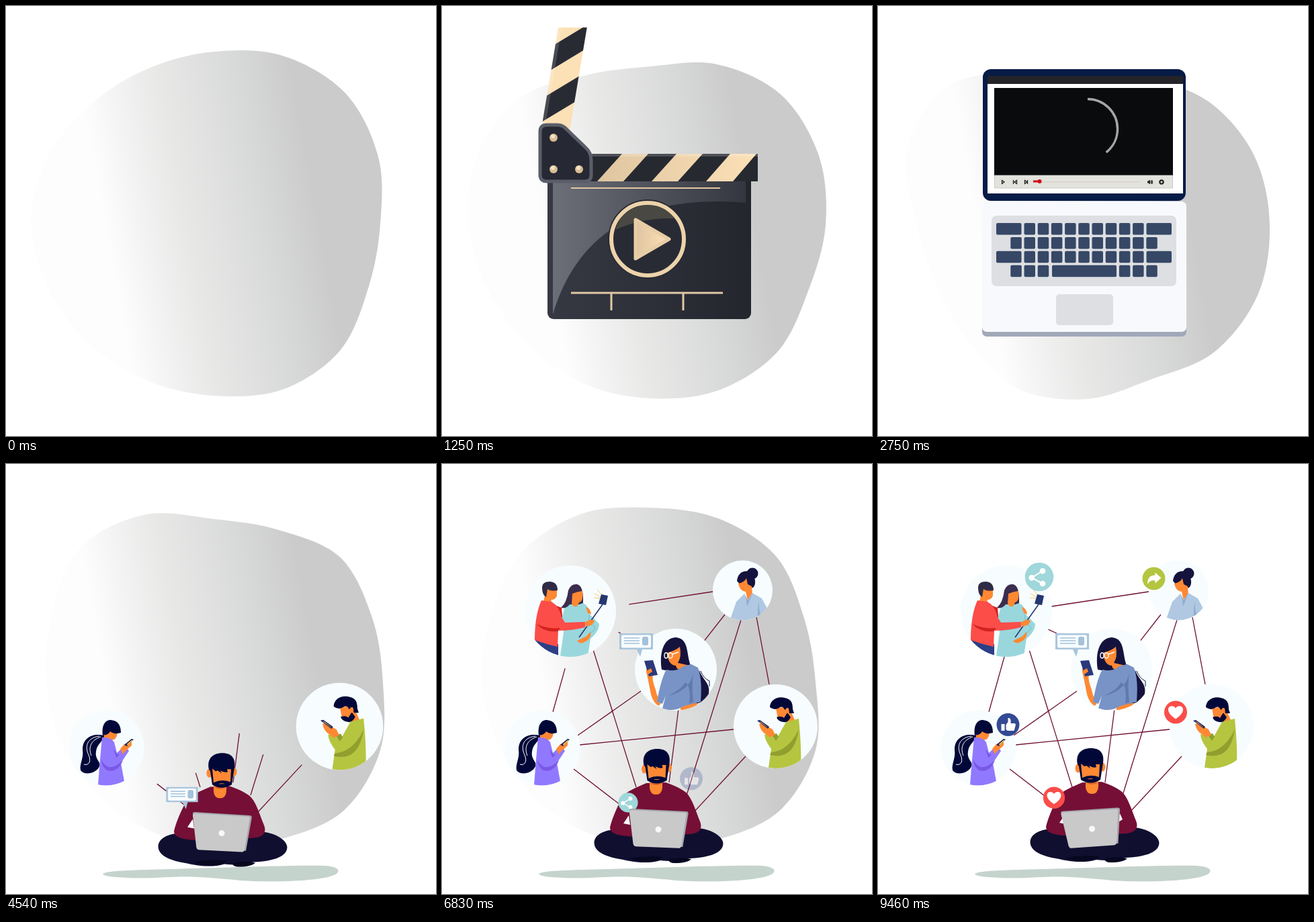
Recreate the animation shown at these times as an HTML page. Size 640 by 640 pixels, loop 9.5 s.

```html
<!DOCTYPE html>
<html lang="en">
<head>
<meta charset="utf-8">
<title>Social video network</title>
<style>
html, body { margin: 0; width: 100%; height: 100%; overflow: hidden; background: #fff; }
svg { display: block; width: 100%; height: 100%; }
.skin { fill: #ff8833; }
.hair { fill: #010838; }
#lines path { fill: none; stroke: #6e0f34; stroke-width: 1.3; }
</style>
</head>
<body>
<svg id="stage" viewBox="0 0 640 640">
<defs>
  <linearGradient id="grey" gradientUnits="userSpaceOnUse" x1="147" y1="320" x2="456" y2="264">
    <stop offset="0" stop-color="#fdfdfd"/><stop offset=".2" stop-color="#f1f1f1"/>
    <stop offset=".37" stop-color="#e8e8e7"/><stop offset=".73" stop-color="#d8dad9"/>
    <stop offset="1" stop-color="#cbcbcb"/>
  </linearGradient>
  <linearGradient id="board" x2="1"><stop stop-color="#363943"/><stop offset="1" stop-color="#24262e"/></linearGradient>
  <linearGradient id="glare" x2="1"><stop stop-color="#6c6f78"/><stop offset="1" stop-color="#353740"/></linearGradient>
  <linearGradient id="cream" x2="1"><stop stop-color="#dfc6a1"/><stop offset="1" stop-color="#fce0b6"/></linearGradient>
  <clipPath id="below"><path d="M0 32H640V640H0z"/></clipPath>
  <g id="heart"><circle r="17" fill="#fb4d49"/><path fill="#fff" d="M0 10C-7 5-11 1-11-4C-11-10-3-11 0-6C3-11 11-10 11-4C11 1 7 5 0 10z"/></g>
  <g id="thumb"><circle r="17" fill="#334a93"/><path fill="#fff" d="M-10-1H-5V9H-10zM-3 0L0-4V-10Q5-11 4-2H10Q12-1 11 2L9 9H-1L-3 7z"/></g>
  <g id="share"><circle r="17" fill="#9fd7da"/><path fill="none" stroke="#fff" stroke-width="1.6" d="M4-7L-9 1L4 8"/><g fill="#fff"><circle cx="4" cy="-7" r="3.5"/><circle cx="-9" cy="1" r="3.5"/><circle cx="4" cy="8" r="3.5"/></g></g>
  <g id="arrow"><circle r="17" fill="#b4c540"/><path fill="#fff" d="M2-9L11-1L2 7V3C-4 2-7 4-9 9C-10 0-6-5 2-5z"/></g>
  <g id="chat"><path fill="#a9c5dc" d="M-25-12H25V12H9L6 23L1 12H-25z"/><rect x="-22" y="-9.500" width="44" height="19" rx="2" fill="#f8fcff"/><path stroke="#a3c1da" stroke-width="1.6" d="M-18-5H5M-18-1H5M-18 3H5"/><rect x="9" y="-7" width="9" height="13" rx="3" fill="#a3c1da"/></g>
</defs>

<path id="blob" fill="url(#grey)"/>

<g clip-path="url(#below)"><g id="clapper">
  <g id="arm">
    <path fill="#fce0b6" d="M0-21H310V21H0z"/>
    <path id="armStripes" fill="#292b34"/>
    <path fill="#fff" opacity=".15" d="M0-21H310V-16H0z"/>
  </g>
  <rect x="157" y="226" width="303" height="240" rx="9" fill="url(#board)"/>
  <path fill="url(#glare)" d="M165 261H452V293C310 281 205 325 165 459z"/>
  <path fill="#272931" d="M205 220H470V261H205z"/>
  <path fill="url(#cream)" d="M268 220h39l-37 41h-39zM349 220h39l-37 41h-39zM429 220h39l-35 41h-40z"/>
  <path fill="#fff" opacity=".18" d="M220 220H470V224H220z"/>
  <path fill="none" stroke="#e0c8a4" stroke-width="2" d="M192 271H414"/>
  <path fill="none" stroke="#e0c8a4" stroke-width="3" d="M192 427H418M252 427V453M359 427V453"/>
  <circle cx="306" cy="347" r="59" fill="#292b34"/>
  <path fill="#494842" d="M258 333A50 50 0 0 1 346 316Q297 315 258 333z"/>
  <circle cx="306" cy="347" r="54" fill="none" stroke="#edd3ab" stroke-width="6"/>
  <path fill="url(#cream)" stroke="#e8cda6" stroke-width="5" stroke-linejoin="round" d="M288 318V376L338 347z"/>
  <path fill="#262833" stroke="#5b5e69" stroke-width="5" d="M156 177H172Q180 177 186 184L213 210Q222 218 222 229V252Q222 261 212 261H156Q146 261 146 251V187Q146 177 156 177z"/>
  <g fill="#d9bd95"><circle cx="166" cy="196" r="6"/><circle cx="166" cy="243" r="6"/><circle cx="204" cy="243" r="6"/></g>
  <g fill="#f3e3ca"><circle cx="165" cy="194" r="3"/><circle cx="165" cy="241" r="3"/><circle cx="203" cy="241" r="3"/></g>
</g></g>

<g id="laptop">
  <rect x="155" y="300" width="304" height="192" rx="7" fill="#a0a9b9"/>
  <rect x="155" y="291" width="304" height="194" rx="7" fill="#f8f9fc"/>
  <rect x="156" y="94" width="302" height="196" rx="12" fill="#071b47"/>
  <path fill="#232328" d="M163 104H454V116H163z"/><path fill="#fff" d="M163 116H454V279H163z"/>
  <path fill="#0a0b0d" d="M173 122H439V252H173z"/>
  <path fill="#e2e3dd" stroke="#b9bab5" stroke-width=".7" d="M173.500 252H438.500V271H173.500z"/>
  <path id="spinner" pathLength="360" fill="none" stroke="#a5a5a6" stroke-width="3.500" d="M312 138.500A44.500 44.500 0 0 1 312 227.500A44.500 44.500 0 0 1 312 138.500"/>
  <path fill="none" stroke="#222" stroke-width="1.300" d="M184.500 259.500V264.500L188 262zM201.500 259V265M206.500 259.500V264.500L203 262zM222.500 259V265M218.500 259.500V264.500L222 262zM406 260Q407.500 262 406 264M407.500 259Q409.500 262 407.500 265"/>
  <path fill="#222" d="M401 260.500H402.500L405 258.500V265.500L402.500 263.500H401z"/>
  <circle cx="422" cy="262" r="2.600" fill="none" stroke="#222" stroke-width="2"/>
  <circle cx="422" cy="262" r="3.500" fill="none" stroke="#222" stroke-dasharray="1.400 1.350"/>
  <path stroke="#d9a9a5" stroke-dasharray="1 1" d="M231 262H390"/>
  <path id="progress" stroke="#d20a18" stroke-width="3"/><circle id="knob" cy="261" r="3" fill="#d20a18"/>
  <rect x="169" y="312" width="275" height="105" rx="7" fill="#dedfe3"/>
  <g id="keys" fill="#364866"></g>
  <rect x="265" y="429" width="85" height="46" rx="5" fill="#dedfe3"/>
</g>

<g id="lines"></g>
<g id="people"></g>

<g id="seated">
  <path fill="#c5d3cd" d="M144 610C150 604 210 604 280 602C350 600 430 597 475 598C493 599 500 605 490 611C470 621 400 623 350 620C290 614 260 613 220 616C180 617 145 615 144 610z"/>
  <g id="bobbing">
    <path fill="#100f30" d="M226.500 563C227 545 255 540 285 543L380 541C400 542 418.500 553 418.500 564C418 580 392 585 368 586C360 590 345 591 325 589C305 595 282 591 270 588C245 584 227 577 226.500 563z"/>
    <path fill="#070720" d="M279 586Q305 581 330 584Q322 591 302 591Q288 590 279 586zM337 588Q350 583 371 587Q365 593 346 593Q338 593 337 588z"/>
    <path fill="#750f35" d="M304 474C288 481 275 486 269 494C262 507 253 526 250 540C250 552 272 553 290 554L368 550C384 549 388 541 384 531C377 514 372 495 362 487C352 480 342 476 333 473z"/>
    <path fill="#fff" d="M278 522L270 534L280 536zM360 520L364 529L356 534z"/>
    <path class="skin" d="M309 465H328V481Q327 491 318.500 491Q310 491 309 481z"/><path fill="#d9622a" d="M309 474H328Q319 480 309 474z"/>
    <g id="head">
      <ellipse class="skin" cx="300.500" cy="453" rx="4" ry="6.500"/><ellipse class="skin" cx="337.500" cy="451" rx="4" ry="6.500"/>
      <path class="hair" d="M300 447C297 433 304 423 320 423C335 423 340 432 338 445L334 470Q319 479 305 470L302 450z"/>
      <path class="skin" d="M305 446L310 450L313 449L319 453L317 449Q324 453 328 451L327 447L333 447L332 466Q319 461 307 467z"/>
      <path class="skin" d="M314 469H324Q319 467 314 469z"/>
    </g>
  </g>
</g>
<g id="floating"></g>
<g id="notebook">
  <path fill="#a4a6ad" d="M-44-28Q-44-30-41-30L40-28Q44-28 44-25L37 25L-35 24z"/>
  <path fill="#c9c9c9" d="M-44-26Q-43-28-40-28L38-26Q42-26 41-23L35 23Q34 27 31 27L-33 26Q-36 26-37 22z"/>
  <circle r="4.500" fill="#f8f8f8"/>
</g>
<g id="badges"></g>
</svg>

<script>
const LOOP = 9500;
const $ = id => document.getElementById(id);
const clamp = x => Math.max(0, Math.min(1, x));
const span = (t, start, end) => clamp((t - start) / (end - start));
const smooth = x => x * x * (3 - 2 * x);
const pop = (t, start, length = 600) => {
  const u = span(t, start, start + length) - 1;
  return 1 + 2 * u ** 3 + u * u;
};
const place = (el, x, y, scale, opacity = 1) => {
  el.setAttribute('transform', `translate(${x} ${y}) scale(${scale})`);
  el.setAttribute('opacity', opacity);
  el.style.display = scale > 0.001 && opacity > 0 ? '' : 'none';
};
const scaleAbout = (el, x, y, scale, opacity = 1) => {
  place(el, x, y, scale, opacity);
  el.setAttribute('transform', `translate(${x} ${y}) scale(${scale}) translate(${-x} ${-y})`);
};

// Value at time t from [time, value] pairs
function keyed(keys, t, ease = smooth) {
  const i = keys.findIndex(k => k[0] > t);
  if (i === 0) return keys[0][1];
  if (i < 0) return keys.at(-1)[1];
  const [[t0, a], [t1, b]] = [keys[i - 1], keys[i]];
  return a + (b - a) * ease((t - t0) / (t1 - t0));
}

// Blob: radii at equal angles clockwise from the right, around (310, 325)
const blobTimes = [0, 1250, 2750, 4540, 5420, 6830, 9460];
const blobRadii = [
  [247, 248, 265, 266, 255, 253, 257, 264, 273, 267, 256, 252, 257, 271, 276, 264],
  [261, 255, 268, 267, 259, 257, 256, 260, 271, 277, 269, 241, 235, 258, 274, 271],
  [273, 276, 269, 250, 260, 265, 247, 241, 253, 289, 291, 247, 229, 236, 258, 270],
  [251, 267, 271, 253, 245, 241, 241, 245, 250, 262, 283, 270, 243, 246, 264, 254],
  [246, 267, 271, 254, 245, 243, 243, 244, 249, 260, 281, 275, 253, 252, 262, 248],
  [246, 266, 271, 254, 244, 243, 243, 244, 251, 257, 272, 271, 260, 264, 265, 248],
  [246, 266, 271, 254, 244, 243, 243, 244, 251, 255, 258, 263, 278, 283, 269, 249]];

function blobPath(t) {
  const n = blobRadii[0].length;
  const points = blobRadii[0].map((_, i) => {
    const r = keyed(blobTimes.map((time, k) => [time, blobRadii[k][i]]), t, x => x);
    const a = i * 2 * Math.PI / n;
    return [310 + r * Math.cos(a), 325 + r * Math.sin(a)];
  });
  const at = i => points[(i + n) % n];
  let d = 'M' + points[0];
  for (let i = 0; i < n; i++) {
    const [a, b, c, e] = [at(i - 1), at(i), at(i + 1), at(i + 2)];
    d += 'C' + [0, 1].map(k => b[k] + (c[k] - a[k]) / 6) + ' '
      + [0, 1].map(k => c[k] - (e[k] - b[k]) / 6) + ' ' + c;
  }
  return d + 'z';
}

// Clapper arm stripes and keyboard
$('armStripes').setAttribute('d', [0, 1, 2, 3].map(k => `M${21 + 78 * k}-21h39l36 42h-39z`).join(''));
const key = (x, y, w = 16.5) => `<rect x="${x}" y="${y}" width="${w}" height="17.500" rx="2"/>`;
const column = i => 197.3 + 20.2 * i;
for (let row = 0; row < 4; row++) {
  const y = 323 + 20.9 * row, wide = row % 2 === 0;
  let html = wide ? key(176, y, 37.5) + key(399.5, y, 37.5) : key(column(0), y) + key(column(10), y);
  for (let i = 1; i < 10; i++) if (row < 3 || i < 3 || i > 7) html += key(column(i), y);
  if (row === 3) html += key(259, y, 96);
  $('keys').innerHTML += html;
}

// Connections: path, start, end
const lines = [
  ['M265 507L196 454', 3900, 5000], ['M289 481L225.500 278', 4290, 6700],
  ['M338 474L360 302L421 224', 4130, 5650], ['M364 493L445 232', 4160, 5800],
  ['M375 518L452 435', 3650, 4700], ['M434 395L205 418', 5100, 6300],
  ['M202 404L296 338', 5240, 6200], ['M487 328L468 228', 5600, 6500],
  ['M403 190L258 212', 5800, 7000], ['M165 369L188 287', 6000, 7050],
  ['M266 252L253 246', 6700, 7200],
].map(([d, start, end]) => {
  $('lines').insertAdjacentHTML('beforeend', `<path d="${d}" pathLength="1"/>`);
  return { el: $('lines').lastChild, start, end };
});

const people = [
  { x: 149.5, y: 422.5, r: 56, start: 3850, art: `
    <path class="hair" d="M146 404C128 400 114 408 114 425C116 438 109 446 111 456C117 464 134 461 139 450C142 443 132 440 134 428C135 418 143 413 147 406z"/>
    <path fill="none" stroke="#fff" d="M139 405C118 408 118 423 123 433C128 445 121 449 116 447M141 406C124 412 123 424 127 434"/>
    <path class="skin" d="M149 397H166Q166 407 161 410L153 412L145 408z"/>
    <path class="hair" d="M144 404C142 388 148 381 156 381C167 382 171 389 171 400Q161 403 155 398Q153 403 144 404z"/>
    <path fill="#9179ff" d="M143 407Q156 406 161 414L165 430L177 419L183 427L171 445L176 472Q157 481 137 478L140 440z"/>
    <path fill="#7a58e6" d="M142 440Q152 462 174 441Q166 460 151 456Q143 452 142 440zM160 424L165 431L169 433L164 437z"/>
    <path class="skin" d="M170 424L176 417L187 414L187 419L178 427L174 432z"/>
    <path fill="#20255e" d="M176 418L187 409L190 410L180 420z"/><path fill="#ffc34d" d="M180 417L187 411L189 411L181 419z"/>` },
  { x: 496.5, y: 390.5, r: 62.5, start: 4140, art: `
    <path class="skin" d="M497 363L517 361L521 372L525 381L514 386L512 380L500 380z"/>
    <path class="hair" d="M498 377Q505 374 509 378L514 370L519 377Q514 386 508 384Q500 383 498 377zM488 362C488 351 500 345 510 348C521 350 522 357 522 365L524 371L517 371L515 363L510 366Q508 360 503 362Q496 368 488 362z"/>
    <ellipse class="skin" cx="514" cy="367" rx="2.500" ry="4"/>
    <path fill="#b5c540" d="M512 384L531 379C533 400 535 425 534 447Q512 456 486 452L490 424Q480 411 480 402L489 403L497 411z"/>
    <path fill="#909f2d" d="M531 395Q516 427 490 429L488 433Q524 442 531 395zM490 403L498 401L501 406L497 412z"/>
    <path class="skin" d="M472 387L477 386L492 395L496 403L488 407L482 402Q474 398 472 387z"/>
    <path fill="#20255e" d="M469 382L473 381L487 391L485 394z"/><path fill="#ffc34d" d="M472 383L483 391L485 392L475 384z"/>` },
  { x: 191, y: 219, r: 68, start: 5200, art: `
    <path fill="#2c3f87" d="M138 260L173 268V290H138z"/>
    <path class="skin" d="M155 186H171V196Q169 202 163 202L162 208L151 205z"/>
    <path fill="#2f2b47" d="M149 184Q149 175 161 175Q172 176 172 188Q162 190 157 186L155 198Q149 195 149 184z"/>
    <path fill="#d4221f" d="M160 207L178 214L180 238L165 235z"/>
    <path fill="#9ad7dd" d="M184 209L210 207Q219 211 219 223L234 238Q234 249 221 260L217 286Q194 290 176 286L181 250L178 230z"/>
    <path fill="#3b2d4e" d="M188 188Q192 178 201 179Q211 181 210 207L204 209L190 209Q185 216 177 214Q186 206 188 188z"/>
    <path class="skin" d="M194 193Q201 190 209 189Q211 204 204 206L201 212Q195 213 193 208zM214 213Q221 214 222 224L217 222z"/>
    <path fill="none" stroke="#74b9c2" d="M219 224V239Q226 238 228 245Q225 250 219 252"/>
    <path fill="#fc4d49" d="M148 203L163 205Q174 211 178 228L183 236L213 235V243Q195 248 173 248L172 272Q154 268 138 262Q138 225 148 203z"/>
    <path fill="#d4221f" d="M141 238Q156 246 176 244L172 249Q151 251 141 238z"/>
    <path stroke="#26366f" stroke-width="1.600" d="M204 258L239 209"/>
    <path class="skin" d="M212 237Q219 230 227 233Q226 240 215 242zM201 263L214 257L221 250Q223 260 212 265Q205 269 201 263z"/>
    <path fill="#26366f" d="M237 194L247 196L244 210L233 208z"/>
    <path stroke="#ffc36b" d="M236 198L227 193M237 194L231 187M235 200L226 199"/>` },
  { x: 348, y: 306, r: 61, start: 5600, art: `
    <path fill="#15133e" d="M383 307C388 322 400 326 397 342C393 357 378 357 361 358zM327 306C323 280 330 259 348 258C369 260 363 285 371 302L354 311z"/>
    <path fill="none" stroke="#15133e" d="M385 308Q389 319 398 323V331"/>
    <path class="skin" d="M335 281Q347 278 354 272Q357 287 351 296L368 300L360 305Q350 309 348 300Q337 300 335 281zM304 309Q303 303 309 302L314 314Q312 320 318 336Q320 348 327 354L323 360Q315 357 311 343Q307 322 304 309zM355 363Q365 355 381 356L375 366H355z"/>
    <g fill="none" stroke="#fff" stroke-width="1.400"><ellipse cx="333.500" cy="285" rx="2.500" ry="4"/><ellipse cx="340" cy="285" rx="3" ry="4"/><path d="M343 283L352 280"/></g>
    <path fill="#7893c6" d="M334 306Q349 310 359 301L371 298L381 303C387 320 386 338 385 354L361 360Q344 370 328 364L333 345L328 357L320 354C323 337 327 318 334 306z"/>
    <path fill="#6179ad" d="M374 310Q371 330 374 354L368 357Q371 330 362 325Q356 336 337 345Q370 337 374 310z"/>
    <path fill="#2b397b" d="M301 293L314 292L321 314L308 316z"/><path class="skin" d="M304 308L311 304L313 309L307 313z"/>` },
  { x: 447.5, y: 188, r: 44.5, start: 5800, art: `
    <circle cx="462" cy="163" r="8.500" fill="#15133e"/>
    <path fill="#15133e" d="M439 174C440 163 448 158 456 160C466 164 469 178 463 184L449 186z"/>
    <path class="skin" d="M441 178Q450 176 453 170L455 179L461 182L462 196L455 203L452 190Q443 189 441 178z"/>
    <path fill="#b0c8e1" d="M450 193L455 202L462 192L476 200L484 215Q462 239 429 231L438 205z"/>
    <path fill="#91add1" d="M462 193L455 203L452 196L454 212zM472 205Q471 220 476 226L470 230Q469 215 472 205z"/>` },
].map((p, i) => {
  $('people').insertAdjacentHTML('beforeend', `<g><clipPath id="ring${i}"><circle cx="${p.x}" cy="${p.y}" r="${p.r}"/></clipPath>
    <circle cx="${p.x}" cy="${p.y}" r="${p.r}" fill="#f7fdff"/><g clip-path="url(#ring${i})">${p.art}</g></g>`);
  return { ...p, el: $('people').lastChild };
});

const addIcon = (parent, name) => {
  $(parent).insertAdjacentHTML('beforeend', `<g><use href="#${name}"/></g>`);
  return $(parent).lastChild;
};
const badges = [
  ['chat', 289, 264, 1, 6000], ['share', 240, 168, 1.25, 7000], ['arrow', 410.5, 170.5, 1, 7300],
  ['heart', 443, 369.5, 1, 7500], ['thumb', 193.5, 388, 1, 7900],
].map(([name, x, y, size, start]) => ({ el: addIcon('badges', name), x, y, size, start }));
const floats = [
  ['chat', 262, 511, 3850], ['thumb', 371, 518, 5020], ['share', 277, 515, 6430],
  ['arrow', 371, 518, 7500], ['heart', 262, 516, 8760],
].map(([name, x, y, start]) => ({ el: addIcon('floating', name), x, y, start }));

const bob = [[3200, 0], [4400, 6.5], [4700, 6.5], [5420, -1], [6100, -1], [6830, 1], [7830, 7], [9000, 1], [9460, 0]];
const headShift = [[4540, 2], [5420, -1], [6830, .5], [9460, -3]];
const tilt = [[4540, 2], [5420, -.5], [6830, 1.5], [9460, -5]];
const notebookX = [[4540, 321], [5420, 320], [6830, 322], [9460, 318.5]];
const armAngle = [[250, 0], [850, -80.5], [1300, -80.5], [1550, 0]];

function render(t) {
  $('blob').setAttribute('d', blobPath(t));
  $('blob').style.display = t < 9440 ? '' : 'none';

  scaleAbout($('clapper'), 308, 340, t < 1960 ? pop(t, 20, 450) : 0);
  $('arm').setAttribute('transform', `translate(167 196) rotate(${keyed(armAngle, t)})`);

  scaleAbout($('laptop'), 307, 292, smooth(span(t, 1940, 2300)), 1 - span(t, 2950, 3200));
  $('spinner').setAttribute('stroke-dasharray', `${141 * span(t, 2250, 2750) + 219 * span(t, 2750, 3200)} 720`);
  const knob = Math.max(231, 231 + 9.5 * (t - 2200) / 550);
  $('progress').setAttribute('d', `M231 261H${knob}`);
  $('knob').setAttribute('cx', knob);

  const arrive = smooth(span(t, 3100, 3600)), lift = keyed(bob, t);
  scaleAbout($('seated'), 320, 610, arrive, arrive);
  $('bobbing').setAttribute('transform', `translate(0 ${lift})`);
  $('head').setAttribute('transform', `translate(${keyed(headShift, t)} ${lift * .1})`);
  const turn = ` rotate(${keyed(tilt, t)})`;
  place($('notebook'), 320 + (keyed(notebookX, t) - 320) * arrive, 610 + (lift - 67) * arrive, arrive, arrive);
  $('notebook').setAttribute('transform', $('notebook').getAttribute('transform') + turn);

  for (const l of lines) {
    l.el.setAttribute('stroke-dasharray', `${span(t, l.start, l.end)} 2`);
    l.el.style.display = t > l.start ? '' : 'none';
  }
  for (const p of people) scaleAbout(p.el, p.x, p.y, pop(t, p.start));
  for (const b of badges) place(b.el, b.x, b.y, b.size * pop(t, b.start, 500));
  for (const f of floats) {
    const age = t - f.start;
    place(f.el, f.x, f.y - .0275 * age, keyed([[0, 0], [400, .86], [900, 1]], age), age > 0 ? 1 - span(age, 1580, 1890) : 0);
  }
}

const begin = performance.now();
function tick() {
  render((performance.now() - begin) % LOOP);
  requestAnimationFrame(tick);
}
tick();
</script>
</body>
</html>
```
